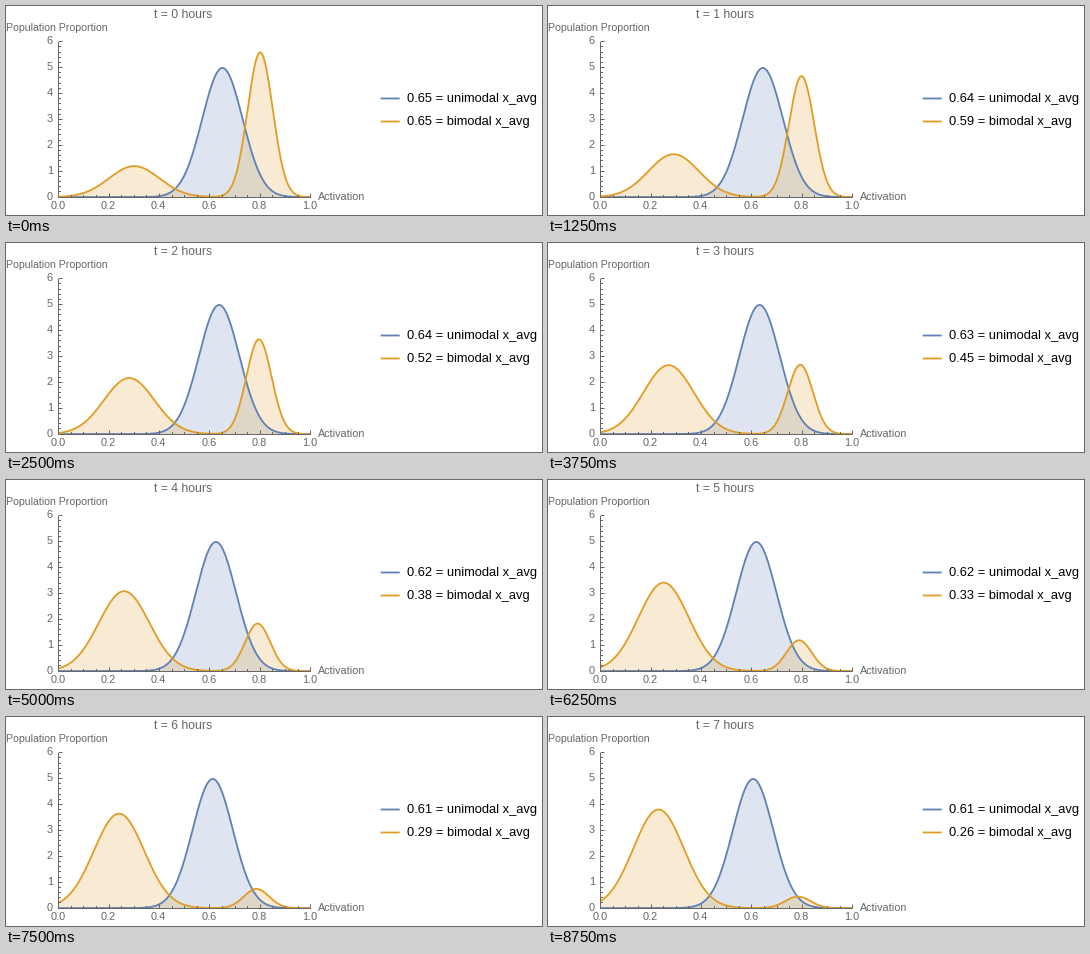
Recreate the animation shown at these times as a matplotlib script. Size 536 by 209 pixels, loop 10 s.

```python
import numpy as np
import matplotlib.pyplot as plt
from matplotlib.animation import FuncAnimation

W, H, DPI = 536, 209, 64
X0, Y0, SX, SY = 52.6, 191.1, 252, 25.9
BLUE, ORANGE, GRAY = "#5E81B5", "#E19C24", "#666666"
HOURS = 8

plt.rcParams["font.family"] = "Liberation Sans"


def px(size):
    """Convert pixels to points."""
    return size * 72 / DPI


fig = plt.figure(figsize=(W / DPI, H / DPI), dpi=DPI, facecolor="white")
ax = fig.add_axes([0, 0, 1, 1])
ax.set_xlim(0, W)
ax.set_ylim(H, 0)
ax.axis("off")


def text(x, y, s, size=10.7, color=GRAY, ha="left"):
    return ax.text(x, y, s, fontsize=px(size), color=color, ha=ha, va="baseline")


def line(x, y, color=GRAY, width=1, z=5):
    return ax.plot(x, y, color=color, lw=px(width), zorder=z, snap=False,
                   solid_capstyle="butt", solid_joinstyle="round")[0]


def gauss(x, mean, sd):
    return np.exp(-((x - mean) / sd) ** 2 / 2) / (sd * np.sqrt(2 * np.pi))


x = np.linspace(0, 1, 401)
starts = [
    gauss(x, 0.65, 0.08),
    0.3 * gauss(x, 0.3, 0.1) + 0.7 * gauss(x, 0.8, 0.05),
]


def evolve(start, t):
    """Cells die off in proportion to their activation."""
    p = start * np.exp(-x * t)
    return p / (p.sum() * (x[1] - x[0]))


def draw_axes():
    line([52, X0 + SX], [191.5, 191.5])
    line([52.5, 52.5], [Y0 - 6 * SY, 192])
    for i in range(21):
        pos = X0 + SX * i / 20
        tx = np.floor(pos) + 0.5
        major = i % 4 == 0
        line([tx, tx], [191, 187.5 if major else 189])
        if major:
            text(pos - 0.8, 203, f"{i / 20:.1f}", size=11, ha="center")
    for i in range(31):
        ty = np.floor(Y0 - SY * i / 5) + 0.5
        major = i % 5 == 0
        line([53, 56.5 if major else 55], [ty, ty])
        if major:
            text(46.8, round(ty + 3), str(i // 5), size=11, ha="right")
    text(0.4, 25, "Population Proportion", 10.5)
    text(312, 194, "Activation")


draw_axes()
title = text(147.7, 12, "", 12.2)
fills, curves, labels = [], [], []
for color, y in ((BLUE, 92.5), (ORANGE, 115.5)):
    fills.append(ax.fill([0, 0, 0], [0, 0, 0], color=color, alpha=0.2, lw=0, zorder=2)[0])
    curves.append(line([], [], color, 1.8, 3))
    line([374.7, 393.7], [y, y], color, 1.8)
    labels.append(text(401, np.floor(y + 4), "", 12.85, "black"))


def update(t):
    title.set_text(f"t = {t} hours")
    gx = X0 + SX * x
    for start, fill, curve, label, name in zip(
            starts, fills, curves, labels, ("unimodal", "bimodal")):
        p = evolve(start, t)
        gy = Y0 - SY * p
        curve.set_data(gx, gy)
        fill.set_xy(np.column_stack([np.r_[gx, gx[-1], gx[0]], np.r_[gy, Y0, Y0]]))
        mean = (x * p).sum() / p.sum()
        label.set_text(f"{mean:.2f} = {name} x_avg")
    return [title, *fills, *curves, *labels]


anim = FuncAnimation(fig, update, frames=HOURS, interval=1250,
                     init_func=lambda: update(0), repeat=True, repeat_delay=0)
plt.show()
```
